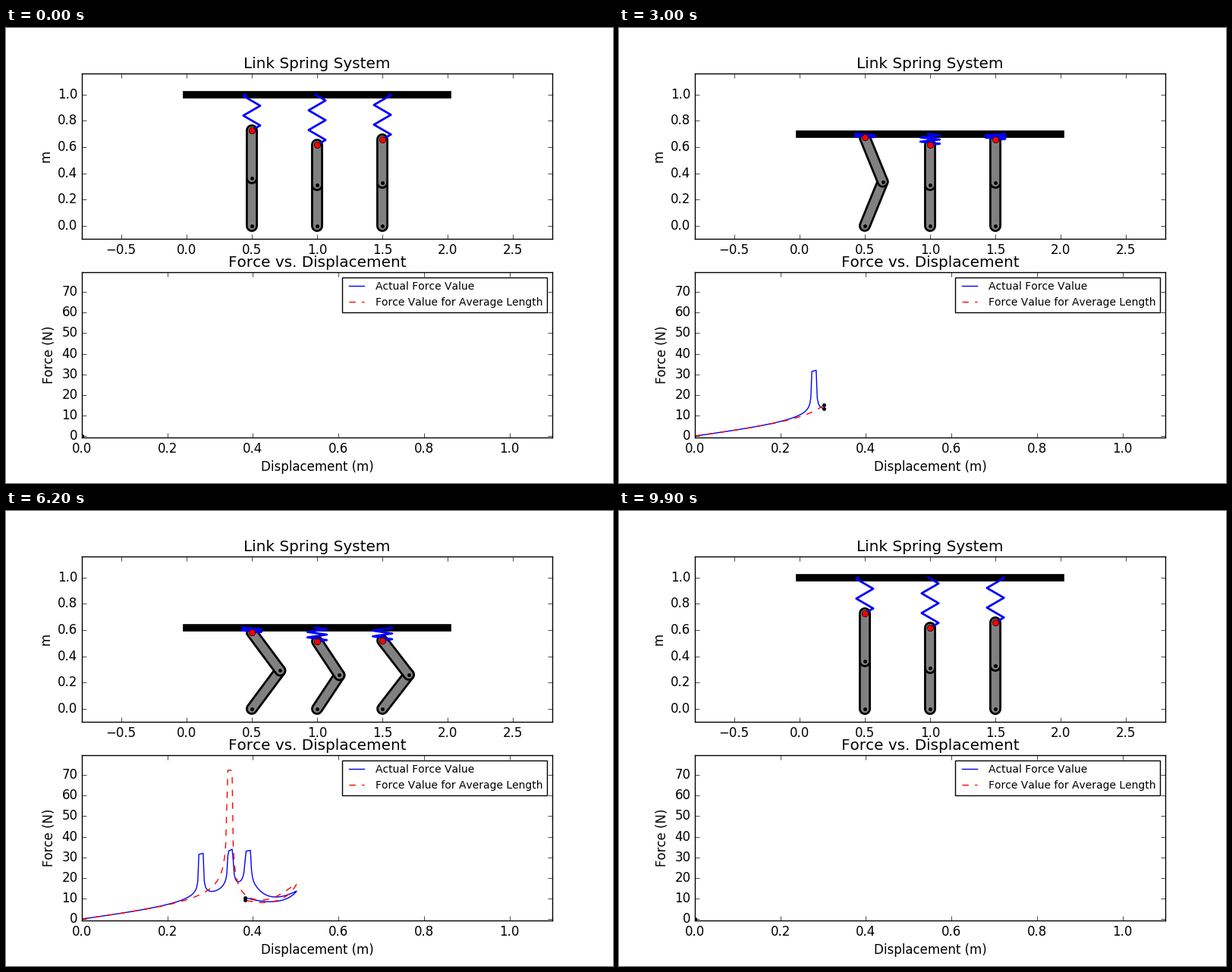
A matplotlib script for the animation above (10 s loop, 800 by 600 pixels).

```python
import numpy as np
import matplotlib.pyplot as plt
from matplotlib.animation import FuncAnimation

plt.style.use("classic")
plt.rcParams.update({"font.family": "DejaVu Sans", "text.kerning_factor": 6})

FRAMES = 100
SUB = 4                 # force samples per frame
FINE = 25               # integration steps per sample
TRAVEL = 0.502          # deepest bar displacement

SEG, PITCH = 0.15, 0.075        # spring segment length and relaxed height
STIFF, F_MAX = 10, 24.1         # initial spring rate, force of a closed spring
HOLD = 0.01                     # travel on a closed spring before the leg buckles
RESIST, GAIN, DAMP = 4.1, 30, 15    # buckled leg: resisting force, 1/mass, damping

half = FRAMES // 2 * SUB * FINE
fine = TRAVEL * (1 - np.abs(np.arange(2 * half + 1) / half - 1))
disp = fine[::FINE]


def force(x, free):
    """Spring force at compression x, stiffening as the coil closes."""
    u = np.clip(x / free, -0.99, 0.9999)
    return np.minimum(STIFF * x * (1 - u * u) ** (-1 / 3), F_MAX)


def leg_height(free):
    """Top of a leg under a spring of the given free length, over the whole cycle."""
    full = h = 1 - free
    v = 0
    dt = TRAVEL / half
    out = []
    for d in fine:
        level = 1 - d
        if h < full:
            push = RESIST - force(free - level + h, free)
            v += (GAIN * push - DAMP * v) * dt
            h = min(h + v * dt, full)
        elif d > free + HOLD:
            h, v = level, -1
        out.append(h)
    return np.array(out[::FINE])


def cycle_force(free, height):
    return force(free - (1 - disp - height), free)


fig, (top, low) = plt.subplots(2, 1, figsize=(8, 6), dpi=100, facecolor="w")
fig.subplots_adjust(left=.125, right=.9, bottom=.1, top=.9, hspace=.2)

top.set(title="Link Spring System", ylabel="m", xlim=(-.8, 2.8), ylim=(-.1, 1.16),
        xticks=np.arange(-.5, 2.6, .5), yticks=np.arange(0, 1.1, .2))
low.set(title="Force vs. Displacement", xlabel="Displacement (m)", ylabel="Force (N)",
        xlim=(0, 1.1), ylim=(-.7, 79.7),
        xticks=np.arange(0, 1.1, .2), yticks=np.arange(0, 71, 10))

bar, = top.plot([0, 2], [1, 1], "k-", lw=7, zorder=2)


class Leg:
    def __init__(self, x, free):
        self.x, self.link = x, (1 - free) / 2
        self.height = leg_height(free)
        self.force = cycle_force(free, self.height)
        self.turns = free / PITCH
        self.phase = np.r_[0, np.arange(.5, self.turns, 1), self.turns]
        self.wave = np.arcsin(np.sin(np.pi * self.phase)) / np.pi
        self.links = [[self.stroke("k", 11.5, z), self.stroke("0.5", 7.5, z + .1)]
                      for z in (3, 3.2)]
        self.pins, = top.plot([], [], "k.", ms=6, zorder=3.5)
        self.spring, = top.plot([], [], "b-", lw=2, zorder=4)
        self.head, = top.plot([], [], "ro", ms=6, zorder=5)

    def stroke(self, color, width, z):
        return top.plot([], [], color=color, lw=width, solid_capstyle="round", zorder=z)[0]

    def pose(self, n, level):
        h = self.height[n]
        knee = self.x + np.sqrt(max(self.link ** 2 - h * h / 4, 0))
        xs, ys = [self.x, knee, self.x], [0, h / 2, h]
        for i, pair in enumerate(self.links):
            for line in pair:
                line.set_data(xs[i:i + 2], ys[i:i + 2])
        self.pins.set_data(xs[:2], ys[:2])
        self.head.set_data([self.x], [h])
        step = max(level - h, 0) / self.turns
        width = np.sqrt(SEG ** 2 - step ** 2)
        self.spring.set_data(self.x + width * self.wave, h + step * self.phase)


legs = [Leg(0.5, 0.273), Leg(1.0, 0.383), Leg(1.5, 0.342)]
actual = sum(leg.force for leg in legs)

MEAN = 0.34
average = 3 * cycle_force(MEAN, leg_height(MEAN))
# The averaged legs swing through once while straightening
swing = np.clip((disp - .118) / .112, 0, 1)
swing[:len(disp) // 2] = 0
average -= 6.6 * np.sin(np.pi * swing) ** 2

curves = []
for values, style, label in [(actual, "b-", "Actual Force Value"),
                             (average, "r--", "Force Value for Average Length")]:
    line, = low.plot([], [], style, label=label)
    tip, = low.plot([], [], "k.", ms=6)
    curves.append((values, line, tip))
low.legend(loc="upper right", fontsize=10)


def draw(frame):
    n = frame % (FRAMES - 1) * SUB      # the last frame is back at rest
    level = 1 - disp[n]
    bar.set_ydata([level, level])
    for leg in legs:
        leg.pose(n, level)
    for values, line, tip in curves:
        line.set_data(disp[:n + 1], values[:n + 1])
        tip.set_data([disp[n]], [values[n]])
    return []


anim = FuncAnimation(fig, draw, frames=FRAMES, interval=100, repeat=True,
                     repeat_delay=0, blit=False)
plt.show()
```
